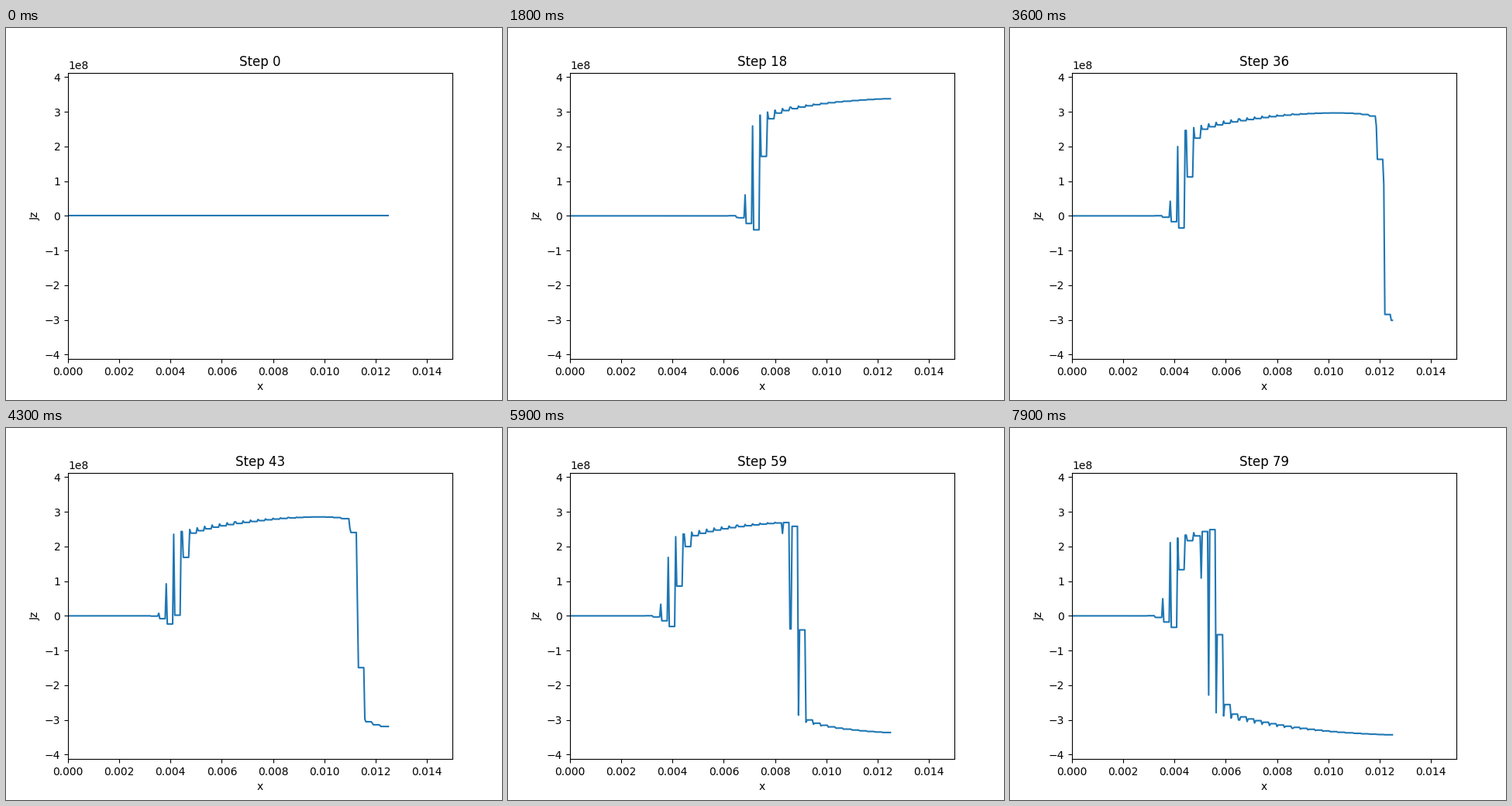
Write a matplotlib script that moves like this. It is 640 px wide and 480 px high and loops after 8000 ms.

```python
import numpy as np
import matplotlib.pyplot as plt
from matplotlib.animation import FuncAnimation

# Current density in a superconducting slab under a cycling field:
# linear elements, power-law resistivity, implicit Euler in time.
# Units: mm, 1e8 A/m^2, steps.
STEPS = 80
WIDTH = 12.5
CELLS = 42
H = WIDTH / CELLS
POWER = 28
E_REF = 4.0
MASS_LINK = 0.08      # mass shared by neighbouring nodes
THIN = 0.17           # part of a cell covered by its right triangle
LEAD = 1.3            # cells by which right triangles run ahead of the front
BACKFLOW = 0.09


def applied_field():
    """Smooth cubic through a few levels of the drive."""
    tk = np.array([0, 9, 18, 24, 30, 33, 36, 43, 51, 59, 71, 79], float)
    hk = np.array([0, 9.2, 16.94, 21.5, 24.2, 23.6, 21.08,
                   15.6, 8.2, 0.13, -12.05, -19.27])
    mk = np.gradient(hk, tk)
    t = np.arange(STEPS)
    i = np.clip(np.searchsorted(tk, t, side="right") - 1, 0, len(tk) - 2)
    d = tk[i + 1] - tk[i]
    s = (t - tk[i]) / d
    return (hk[i] * (1 + 2 * s) * (1 - s) ** 2 + mk[i] * d * s * (1 - s) ** 2
            + hk[i + 1] * s ** 2 * (3 - 2 * s) + mk[i + 1] * d * s ** 2 * (s - 1))


def solve():
    """Mean current density of every cell at every step."""
    size = CELLS + 1
    link = np.eye(size, k=1) + np.eye(size, k=-1)
    mass = (1 - 2 * MASS_LINK) * np.eye(size) + MASS_LINK * link
    mass[0, 0] = mass[-1, -1] = 0.5 - MASS_LINK
    curl = np.diff(np.eye(size), axis=0) / H
    mids = (np.arange(CELLS) + 0.5) * H
    jc = 3.38 * (1 - 0.0021 * (WIDTH - mids) ** 2)

    def energy(u, old):
        du = u - old
        loss = E_REF * jc * np.abs(curl @ u / jc) ** (POWER + 1) / (POWER + 1)
        return 0.5 * du @ mass @ du + loss.sum()

    u = np.zeros(size)
    history = [np.zeros(CELLS)]
    for field in applied_field()[1:]:
        old = u.copy()
        u[-1] = field
        value = energy(u, old)
        for _ in range(150):
            ratio = curl @ u / jc
            stiff = E_REF * np.abs(ratio) ** (POWER - 1)
            slope = (mass @ (u - old) + curl.T @ (stiff * ratio))[:-1]
            hess = mass + curl.T @ ((POWER * stiff / jc)[:, None] * curl)
            move = np.append(-np.linalg.solve(hess[:-1, :-1], slope), 0)
            gain = slope @ move[:-1]
            if gain > -1e-9:
                break
            scale = 1.0
            while scale > 1e-6:
                trial = u + scale * move
                new = energy(trial, old)
                if new <= value + 1e-4 * scale * gain + 1e-12 * abs(value):
                    break
                scale /= 2
            else:
                break
            u, value = trial, new
        history.append(curl @ u)
    return np.array(history)


def split(mean):
    """Left and right triangle values, lagging and leading the cell mean."""
    c = np.arange(CELLS)
    shift = LEAD * np.minimum(1, (CELLS - 0.5 - c) / 17)
    left = np.interp(c - shift, c, mean)
    right = np.interp(c + shift, c, mean)
    slack = np.clip(1 - (left / 2.6) ** 2, 0, 1)
    left = left - BACKFLOW * (right - left) * slack
    return np.column_stack([left, right]).ravel()


x = np.linspace(0, WIDTH, 301)
cell = np.minimum(np.floor(x / H + 1e-9).astype(int), CELLS - 1)
element = 2 * cell + (x / H - cell > 1 - THIN)
current = np.array([split(mean)[element] for mean in solve()]) * 1e8

fig, ax = plt.subplots(figsize=(6.4, 4.8), dpi=100)
line, = ax.plot(x / 1000, current[0])
ax.set_xlim(0, 0.015)
ax.set_ylim(-4.13e8, 4.13e8)
ax.set_xlabel("x")
ax.set_ylabel("Jz")
title = ax.set_title("Step 0")


def update(step):
    line.set_ydata(current[step])
    title.set_text(f"Step {step}")
    return line, title


anim = FuncAnimation(fig, update, frames=STEPS, interval=100,
                     repeat=True, repeat_delay=0, blit=False)
plt.show()
```
